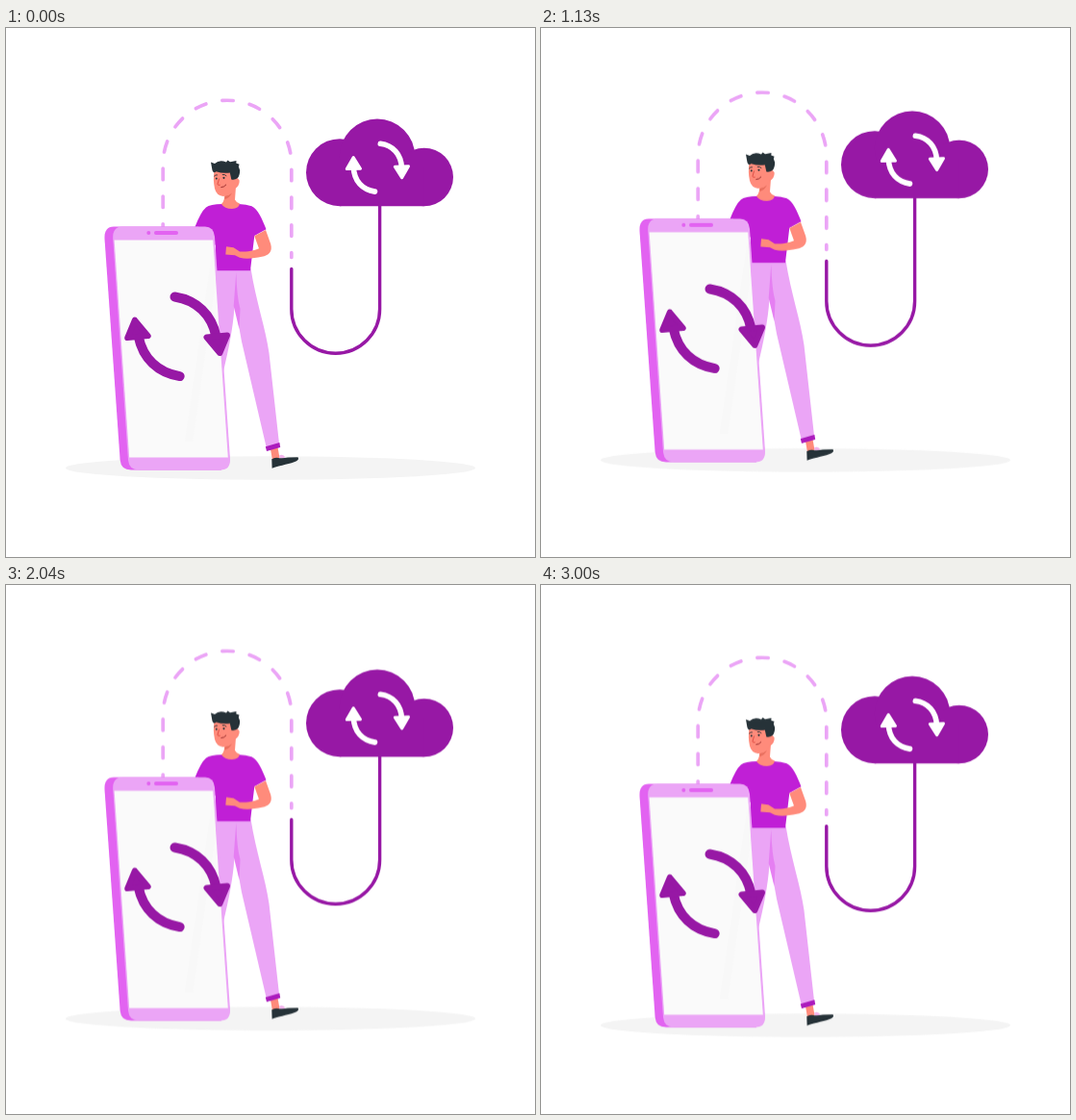
An HTML page without scripts for the animation above (3040 ms loop, 550 by 550 pixels).

```html
<!DOCTYPE html>
<html lang="en">
<head>
<meta charset="utf-8">
<title>Cloud sync</title>
<style>
  html, body { margin: 0; width: 100%; height: 100%; overflow: hidden; background: #fff; }
  svg { display: block; width: 100vw; height: 100vh; }

  .scene { animation: bob 3040ms linear infinite; }
  @keyframes bob {
    0% { transform: translateY(0); }
    48.5% { transform: translateY(-10.7px); }
    98.3%, 100% { transform: translateY(.3px); }
  }

  .deep { fill: #9718a5; }
  .light { fill: #eba5f6; }
  .mid { fill: #e263f1; }
  .shirt { fill: #c01fd6; }
  .skin { fill: #ff8b7b; }
  .dark { fill: #263238; }
  .line { fill: none; stroke-linecap: round; stroke-linejoin: round; }
  .ink { stroke: #263238; stroke-width: .9; }
  .head { stroke-linejoin: round; }
</style>
</head>
<body>
<svg viewBox="0 0 550 550">
  <defs>
    <g id="bigArrow" stroke="#9718a5">
      <path class="line" stroke-width="10" d="M175.5 279.5C198 283 214 298 218.5 321"/>
      <path class="deep head" stroke-width="6" d="M208.5 321.5L230 319.5L222.3 338Z"/>
    </g>
    <g id="smallArrow" stroke="#fff">
      <path class="line" stroke-width="5.6" d="M389.3 120.3C402 122 411 131 411.5 146"/>
      <path class="head" fill="#fff" stroke-width="3" d="M404.3 144.2L418.5 143.8L411.6 155.8Z"/>
    </g>
  </defs>

  <g class="scene">
    <ellipse cx="275" cy="457.5" rx="213" ry="12.2" fill="#f4f4f4"/>

    <!-- cables -->
    <path class="line" stroke="#eba5f6" stroke-width="3.7" stroke-dasharray="11.5 17.3"
          d="M163.2 215.3V142A66.8 66.8 0 0 1 296.8 142V238.5"/>
    <path class="line" stroke="#9718a5" stroke-width="3.4"
          d="M296.8 250.5V292.3A45.9 45.9 0 0 0 388.6 292.3V180"/>

    <!-- cloud -->
    <g class="deep">
      <circle cx="347" cy="150.2" r="35"/>
      <circle cx="386" cy="133.6" r="39.2"/>
      <circle cx="434.7" cy="155" r="30.3"/>
      <path d="M347 145H434.7V185.3H347Z"/>
    </g>
    <use href="#smallArrow"/>
    <use href="#smallArrow" transform="rotate(180 386.4 145.2)"/>

    <!-- legs -->
    <path class="skin" d="M275 438L282.5 436L284.5 447L277 449Z"/>
    <path fill="#f3b3ec" d="M284 444.5Q288 442.5 290.5 446.5L285 448Z"/>
    <path class="dark" d="M276.3 448.3Q281 446 284.5 447.3Q289 447.6 293 446.6L303.5 446.2Q305 448.5 302 450.2C296 453.5 286 454 276.6 457.8Z"/>
    <path class="light" d="M216 250H241L237.5 290C236 313 231 336 226 357L208 352Z"/>
    <path class="light" d="M238 250H254.5C260 285 270 312 273.5 338L284 432L270.8 436.5L245 326Q237 288 238 250Z"/>
    <path fill="#e57ff2" d="M239.3 254Q240 280 243.5 292L242.5 313L236.7 289Z"/>
    <path fill="#ab1bbd" d="M269.8 435.3L284.4 431L285.2 436L271 440Z"/>

    <!-- torso and arm -->
    <path class="shirt" d="M225 183Q212 183.3 208 186.5Q202.5 191 196 208L218 226V252.3H254L258.3 216L270.5 209.2C266 198 262 188.5 255.5 185.3Q250 183.3 242 183Z"/>
    <path class="skin" d="M258.3 216.2L270 210L275.2 224.5C277.5 233 273 236.5 266 237.8C258 239.5 250 240.5 243 238.8L238 236.3L228.3 235.6L229 227.3L236.5 228.2L243 232.6C252 232.6 258 231.5 263 229.2Z"/>

    <!-- head -->
    <path class="skin" d="M227.3 170L239 165L238 178.5Q239 181 243 182.6Q242 188 235 188Q227 188 224 183Q227.8 180 227.3 170Z"/>
    <path fill="#e8705f" d="M227.4 174.8Q232 174.5 235 171.5Q232 177 227.5 178Z"/>
    <path class="skin" d="M216.6 147Q215 158 217 167Q219 174.8 226 174.9Q234.5 174 237 167.3Q243 165 242.7 158.5Q241 155 238 156L234 147Z"/>
    <path class="dark" d="M214.5 148L213 139.5L217 141Q222 136.5 229 139.6L230.5 137.6L233 139.2L239.5 138L239.3 140.6L242.6 141.8L241.8 144L243.2 148Q243 154 240.5 156.3Q238 158.3 234.3 157.6L232.8 150.6Q225 151.5 218.5 149.2Q216 152 214.5 148Z"/>
    <path class="line ink" d="M216.5 154Q217.7 152.4 219.5 152.8M225.2 152.4Q227.5 151.8 229 153.6"/>
    <circle class="dark" cx="218.8" cy="156.6" r="1"/>
    <circle class="dark" cx="226.5" cy="155.8" r="1.1"/>
    <path class="line" stroke="#e04f45" stroke-width="1" d="M221.5 157L219.9 162.5Q220.7 163.7 222.3 163.3"/>
    <path class="line" stroke="#9b3030" stroke-width="1" d="M223.8 165.6Q227 165.6 228.8 163"/>

    <!-- phone -->
    <path class="mid" d="M112 206.5H200L224 459.5H130Q119.6 459.5 118.6 449L102.5 219Q102 206.5 112 206.5Z"/>
    <path class="light" d="M121 206.5H207Q216 206.5 217 217L233 448Q233.4 459.5 223 459.5H138Q128 459.5 127 449L111.2 219Q110.6 206.5 121 206.5Z"/>
    <path fill="#fafafa" d="M112.6 220.5H215.2L230.8 446.6H128.2Z"/>
    <path fill="#f7f7f7" opacity=".6" d="M215.5 225L218 262L194 430H186Z"/>
    <g class="mid">
      <circle cx="148.3" cy="213" r="2"/>
      <rect x="154" y="211" width="25" height="4" rx="2"/>
    </g>
    <use href="#bigArrow"/>
    <use href="#bigArrow" transform="rotate(180 178.1 320.8)"/>
  </g>
</svg>
</body>
</html>
```
